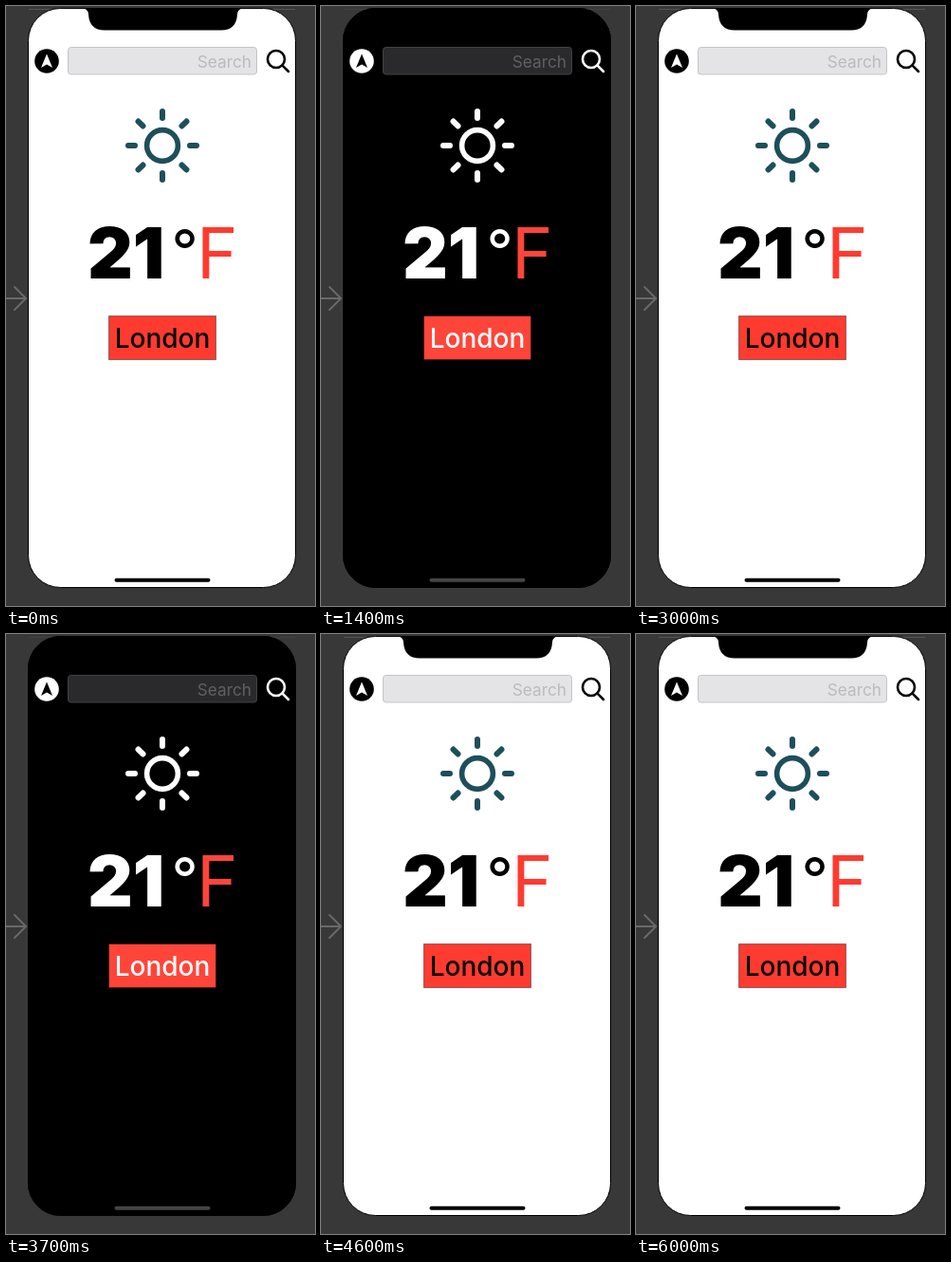
These frames come from a looping animation (326 px wide and 632 px high, 6.2 s). An HTML page:

```html
<!DOCTYPE html>
<html lang="en">
<head>
<meta charset="utf-8">
<title>Weather</title>
<style>
html, body { margin: 0; width: 100%; height: 100%; overflow: hidden; background: #383838; }
svg { display: block; width: 326px; height: 632px; }
text { font-family: Inter, "Liberation Sans", sans-serif; }
.light {
  --bg: #fff; --ink: #000; --sun: #1d4f5b; --red: #ff3b30; --top: #555;
  --field: #e4e4e6; --edge: #c4c4c7; --hint: #bbbbbe; --home: #000;
}
.dark {
  --bg: #000; --ink: #fff; --sun: #fff; --red: #ff453a; --top: #424242;
  --field: #2a2a2c; --edge: #434346; --hint: #606064; --home: #454545;
  animation: theme 6.2s step-end infinite;
}
@keyframes theme {
  0%, 40.32%, 74.19% { visibility: hidden; }
  22.58%, 59.67% { visibility: visible; }
}
.line { fill: none; stroke-linecap: round; }
.ink { fill: var(--ink); }
.red { fill: var(--red); }
</style>
</head>
<body>
<svg viewBox="0 0 326 632">
  <defs>
    <path id="ray" d="M165 111v7"/>
    <g id="screen">
      <path d="M24 3.5H305" stroke="var(--top)"/>
      <rect x="23.5" y="2.5" width="282" height="610" rx="34" fill="var(--bg)" stroke="#000"/>
      <path d="M82 2.5H249Q244 4 244 9Q243 25.5 227 25.5H104Q88 25.5 87 9Q87 4 82 2.5Z"/>

      <circle class="ink" cx="43" cy="58" r="12.8"/>
      <path d="M43 50.5L49 65L43 61.5L37 65Z" fill="var(--bg)"/>
      <rect x="65.5" y="43.5" width="199" height="28.5" rx="3" fill="var(--field)" stroke="var(--edge)"/>
      <text x="259" y="64.5" font-size="17.3" text-anchor="end" fill="var(--hint)">Search</text>
      <g class="line" stroke="var(--ink)" stroke-width="2.6">
        <circle cx="285" cy="56" r="9"/>
        <path d="M291.6 62.6L298 69"/>
      </g>

      <g class="line" stroke="var(--sun)" stroke-width="6">
        <circle cx="165" cy="147" r="16.4" stroke-width="5.6"/>
        <use href="#ray"/>
        <use href="#ray" transform="rotate(45 165 147)"/>
        <use href="#ray" transform="rotate(90 165 147)"/>
        <use href="#ray" transform="rotate(135 165 147)"/>
        <use href="#ray" transform="rotate(180 165 147)"/>
        <use href="#ray" transform="rotate(225 165 147)"/>
        <use href="#ray" transform="rotate(270 165 147)"/>
        <use href="#ray" transform="rotate(315 165 147)"/>
      </g>

      <g font-size="74">
        <text class="ink" x="86" y="287" font-weight="900">21</text>
        <text class="ink" x="174.5" y="280" font-size="62" font-weight="400">°</text>
        <text class="red" x="201" y="287" font-weight="400">F</text>
      </g>

      <rect class="red" x="108.5" y="326.5" width="113" height="46" stroke="#000" stroke-opacity=".4"/>
      <text class="ink" x="165" y="360" font-size="28" font-weight="500" text-anchor="middle">London</text>
      <rect x="114.5" y="602.8" width="101" height="4" rx="2" fill="var(--home)"/>
    </g>
  </defs>
  <rect width="326" height="632" fill="#383838"/>
  <path class="line" d="M0 308H21M9 296L21 308L9 320" stroke="#696969" stroke-width="2"/>
  <use class="light" href="#screen"/>
  <use class="dark" href="#screen"/>
</svg>
</body>
</html>
```
